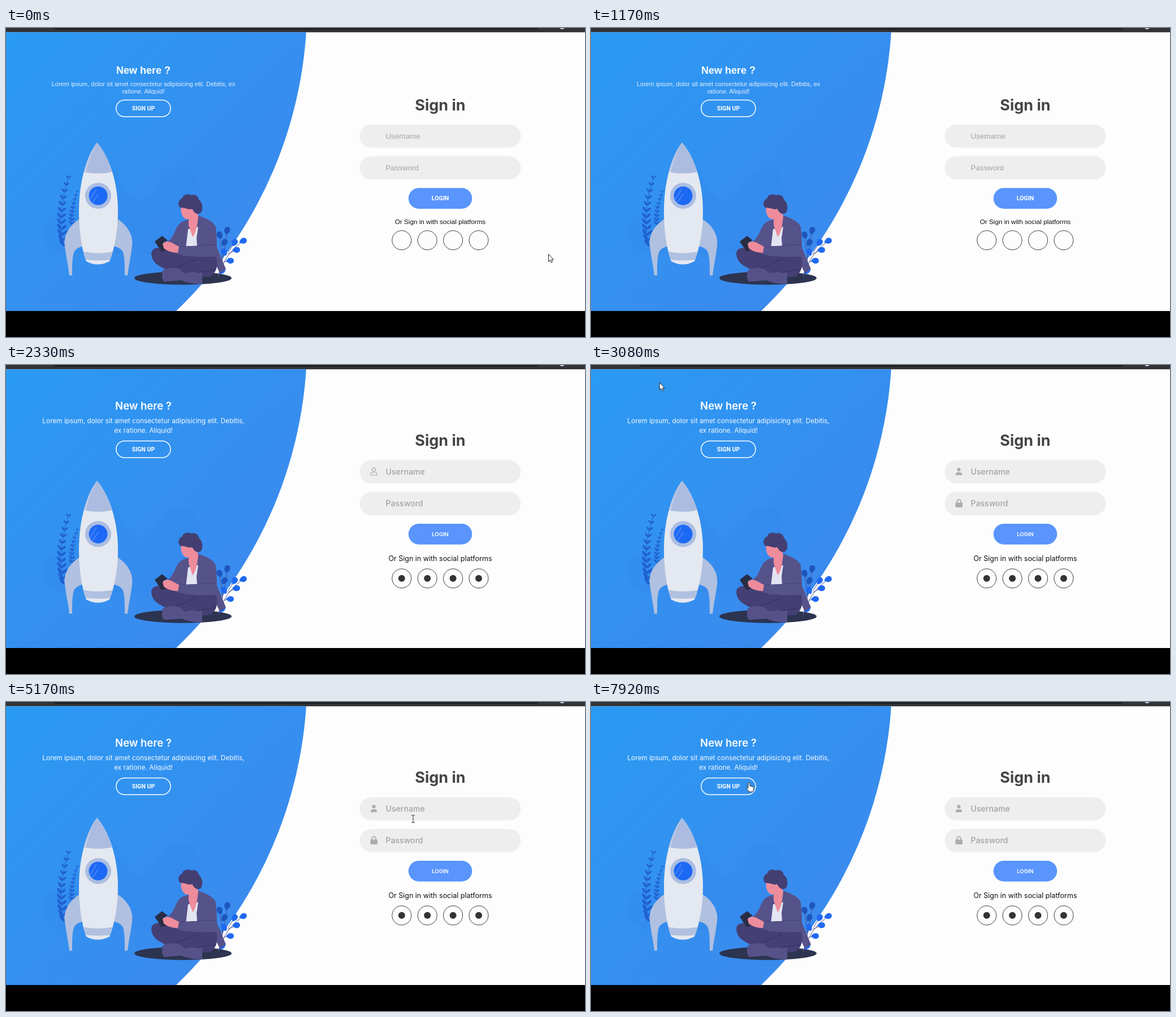
Recreate the animation shown at these times as an HTML page. Size 1024 px wide and 547 px high, loop 8000 ms.

```html
<!DOCTYPE html>
<html lang="en">
<head>
<meta charset="utf-8">
<title>Sign in</title>
<style>
  html, body { margin: 0; width: 100%; height: 100%; overflow: hidden; background: #000; }
  svg { display: block; width: 1024px; height: 547px; }
  .fallback { font-family: "Liberation Sans", Arial, sans-serif; }
  .loaded { font-family: Inter, sans-serif; }
  .button { font-family: Roboto, sans-serif; font-weight: 700; }
</style>
</head>
<body>
<svg viewBox="0 0 1024 547">
  <defs>
    <linearGradient id="sky" x1="1" y1="1" x2="0" y2="0">
      <stop stop-color="#4481eb"/><stop offset="1" stop-color="#04befe"/>
    </linearGradient>
    <clipPath id="view"><path d="M0 7.5H1024V501H0Z"/></clipPath>
    <path id="body" d="M161 203C146 222 129 265 129 325C129 355 133 390 142 413Q162 424 183 413C193 388 198 355 198 325C198 265 178 222 161 203Z"/>
    <clipPath id="inBody"><use href="#body"/></clipPath>

    <g id="art">
      <path d="M66 362Q66 330 95 330L195 250C212 318 255 316 270 276Q285 246 318 247C340 252 345 290 342 312L300 400H100Q66 396 66 362Z" fill="#1b63e0" opacity=".08"/>
      <g id="ferns" fill="#2060d0" stroke="#2060d0"></g>

      <g fill="#b0c0e0">
        <path id="fin" d="M132 337C114 347 101 366 104 386C106 404 110 420 112 438H117C117 420 117 403 121 395Q126 388 138 386Z"/>
        <use href="#fin" transform="matrix(-1 0 0 1 327 0)"/>
      </g>
      <use href="#body" fill="#e4e8f0"/>
      <g clip-path="url(#inBody)">
        <path d="M120 200H205V250Q163 265 120 250Z" fill="#acbce0"/>
        <path d="M161 203C150 222 144 240 142 256L130 250L150 200Z" fill="#bfcae4"/>
        <path d="M125 393Q163 404 202 393V407Q163 416 125 407Z" fill="#b0c0e0"/>
      </g>
      <circle cx="163" cy="297" r="23" fill="#abbde2"/>
      <circle cx="163" cy="297" r="16.5" fill="#1c69f5"/>
      <path d="M149 303L160 285M153 309L163 294" stroke="#4785f8" stroke-width="2"/>

      <ellipse cx="313" cy="442.7" rx="86" ry="11.7" fill="#2c3450"/>
      <g id="sprig"></g>
      <path d="M368 376L389 427L378 434L366 408Z" fill="#56528a"/>
      <path d="M257 399C258 389 269 387 283 391L330 403L371 402C376 419 373 432 362 440L330 443Q284 432 265 417Q257 409 257 399Z" fill="#443f74"/>
      <path d="M277 429Q288 423 304 425L320 437L318 446L280 449Q274 445 277 429ZM311 436Q328 430 347 433V453Q327 454 311 447Z" fill="#565289"/>
      <path d="M300 425L338 409M336 433L371 427" stroke="#393565" stroke-width="1.5"/>
      <path d="M320 340C308 342 303 350 299 360C293 374 287 378 281 380L301 399L318 404L371 405C375 390 372 364 371 352C365 340 352 337 341 332Z" fill="#56528a"/>
      <path d="M322 356L340 352L337 372L338 386L318 390Z" fill="#e2e5f1"/>
      <path d="M310 315C307 330 316 341 323 338L323 349L330 370Q338 361 340 332L329 317Z" fill="#ee8c9c"/>
      <path d="M308 318C302 311 306 304 312 301C313 294 322 293 327 296C335 293 341 299 341 304C347 308 349 318 346 325C343 331 336 329 333 326L329 320C324 323 317 317 308 318Z" fill="#433f72"/>
      <path d="M341 346L338 386L305 388L303 400Q340 408 371 404" fill="#56528a"/>
      <path d="M371 384Q352 383 338 386L308 387" fill="none" stroke="#454177" stroke-width="1"/>
      <path d="M263 378L276 368L286 376L278 380L279 389L284 393L275 396Z" fill="#282d43"/>
      <path d="M277 382Q284 375 293 380L306 387L304 398Q289 398 279 390Z" fill="#ee8c9c"/>
    </g>

    <path id="arrow" d="M.5 .5V13.5L3.4 10.8L5.3 15.2L7.5 14.2L5.6 10H9.5Z" fill="#fff" stroke="#222"/>
    <path id="beam" d="M-3-6.5H-1Q0-6.5 0-5.5Q0-6.5 1-6.5H3M0-5.5V5.5M-3 6.5H-1Q0 6.5 0 5.5Q0 6.5 1 6.5H3" fill="none" stroke="#444" stroke-width="1.1"/>
    <path id="hand" d="M-1.5 1Q0-1 1.5 1V6L7.5 7.5Q8.7 8 8.5 10L7 16.5H0L-4.5 10.5Q-5 8.5-3 9L-1.5 10.5Z" fill="#fff" stroke="#222"/>
  </defs>

  <path d="M0 0H1024V8H0Z" fill="#323336"/>
  <path d="M84 0H942L938 3H88Z" fill="#1e1f22"/>
  <path d="M0 6.5H1024V8H0Z" fill="#202124"/>
  <circle cx="983.5" cy="-3" r="5.2" fill="#c3cad8"/>
  <g clip-path="url(#view)">
    <path d="M0 7H1024V501H0Z" fill="#fdfdfd"/>
    <circle cx="-217.5" cy="-41" r="750" fill="url(#sky)"/>
  </g>
  <g id="before" class="fallback"></g>
  <g id="after" class="loaded"></g>
  <g id="userOutline" fill="none" stroke="#aaa" stroke-width="1.2"><use href="#user"/></g>
  <g id="icons" fill="#acacac">
    <g id="user">
      <circle cx="650.5" cy="185.2" r="3.1"/>
      <path d="M645 195V193.5Q645 190 648.5 190H652.5Q656 190 656 193.5V195Z"/>
    </g>
    <rect x="644.5" y="243.5" width="12.5" height="8.5" rx="1.2"/>
    <path d="M647.3 244V241.8A3.4 3.4 0 0 1 654.1 241.8V244" fill="none" stroke="#acacac" stroke-width="1.8"/>
  </g>
  <use id="cursor"/>
</svg>
<script>
const $ = id => document.getElementById(id);

const text = (x, y, size, fill, str, attrs = 'text-anchor="middle"') =>
  `<text x="${x}" y="${y}" font-size="${size}" fill="${fill}" ${attrs}>${str}</text>`;
const pill = (x, y, w, h, attrs) =>
  `<rect x="${x}" y="${y}" width="${w}" height="${h}" rx="${h / 2}" ${attrs}/>`;

// Fern: leaf pairs along a quadratic curve
function fern([x0, y0, cx, cy, x1, y1], pairs, size) {
  let out = `<path d="M${x0} ${y0}Q${cx} ${cy} ${x1} ${y1}" fill="none" stroke-width="1"/>`;
  for (let i = 0; i <= pairs; i++) {
    const u = i / pairs, v = 1 - u;
    const x = v * v * x0 + 2 * u * v * cx + u * u * x1;
    const y = v * v * y0 + 2 * u * v * cy + u * u * y1;
    const r = size * (1 - 0.55 * u);
    for (const side of [-1, 1])
      out += `<ellipse cx="${r}" rx="${r}" ry="${r * 0.38}" stroke="none" transform="translate(${x} ${y}) rotate(${-82 + side * 42})"/>`;
  }
  return out;
}
$('ferns').innerHTML = fern([103, 386, 88, 335, 110, 266], 11, 7.2) + fern([116, 348, 114, 320, 126, 290], 8, 4);

const leaf = (x, y, angle, fill) =>
  `<path d="M-7 0Q-2-6 2-5A5 5 0 0 1 2 5Q-2 6-7 0Z" fill="${fill}" transform="translate(${x} ${y}) rotate(${angle})"/>`;
const dark = '#1e55bd', bright = '#2069f2';
$('sprig').innerHTML =
  '<path d="M375 441Q386 400 391 362M383 408L378 370M376 438Q388 398 418 378M386 414L397 412M392 400L406 394M393 397L404 380" fill="none" stroke="#4e558f"/>' +
  leaf(391, 359, -75, dark) + leaf(378, 367, -110, dark) + leaf(386, 380, -60, dark) +
  leaf(404, 380, -60, bright) + leaf(419, 377, -20, bright) + leaf(407, 393, -5, bright) +
  leaf(396, 412, 0, bright) + leaf(386, 397, -120, bright) + leaf(382, 430, -60, bright);

function page(ready) {
  const shift = ready ? -2.3 : 0;
  const pick = (early, late) => ready ? late : early;
  const bold = 'text-anchor="middle" font-weight="600"';
  const left = `font-weight="${pick(400, 500)}"`;
  const up = pick(127.5, 134.5);
  const lines = pick(
    ['Lorem ipsum, dolor sit amet consectetur adipisicing elit. Debitis, ex', 'ratione. Aliquid!'],
    ['Lorem ipsum, dolor sit amet consectetur adipisicing elit. Debitis,', 'ex ratione. Aliquid!']);
  let out = `<use href="#art" y="${pick(0, 2.3)}"/>`;
  out += text(243, pick(81, 79), pick(18, 18.5), '#fff', 'New here ?', bold);
  lines.forEach((line, i) =>
    out += text(243, 103 + i * pick(13, 17), pick(11, 11.85), pick('#e3effc', '#f6faff'), line));
  out += pill(194.8, up, 96.2, 29.5, 'fill="none" stroke="#fff" stroke-width="1.5"');
  out += text(243, up + 18.3, 10.5, '#fff', 'SIGN UP', 'text-anchor="middle" class="button"');
  out += text(768, 145.6 + shift, 27, '#444', 'Sign in', 'text-anchor="middle" font-weight="700" class="loaded"');
  ['Username', 'Password'].forEach((label, i) => {
    const y = 170.7 + shift + i * 56.3;
    out += pill(625.5, y, 285, 41.2, 'fill="#eee"');
    out += text(671.5, y + 25.4, pick(13.3, 14.1), '#a3a3a0', label, left);
  });
  out += pill(711.8, 283.2 + shift, 112.5, 36.8, 'fill="#5995fd"');
  out += text(768, 305.4 + shift, pick(10.6, 9.6), '#fff', 'LOGIN', ready ? bold : 'text-anchor="middle" class="button"');
  out += text(768, 347, pick(11.7, 12.5), '#111', 'Or Sign in with social platforms');
  for (let i = 0; i < 4; i++) {
    const x = 699.8 + i * 45.4, y = pick(375.7, 377.8);
    out += `<circle cx="${x}" cy="${y}" r="17" fill="none" stroke="#3a3a3a"/>`;
    if (ready) out += `<circle cx="${x}" cy="${y}" r="6" fill="#333"/>`;
  }
  return out;
}
$('before').innerHTML = page(false);
$('after').innerHTML = page(true);

const LOOP = 8000, FRAME = 1000 / 12, FONTS = 2000, SOLID = 2660;
// Pointer path: time, x, y
const path = [
  [0, 959, 400], [80, 959, 400], [450, 620, 190], [800, 70, -20], [2900, 70, -20],
  [3330, 200, 110], [3750, 412.5, 219.5], [3960, 790, 390], [4170, 959, 300], [4250, 959, 300],
  [4950, 720, 207], [5180, 720, 207], [5600, 771.5, 237], [6920, 771.5, 237],
  [7250, 777, 259], [7450, 775, 252], [7880, 279.5, 142.5], [LOOP, 279.5, 142.5]
];

function pointer(t) {
  const i = Math.max(1, path.findIndex(p => p[0] > t));
  const [t0, x0, y0] = path[i - 1], [t1, x1, y1] = path[i];
  const u = (t - t0) / (t1 - t0), e = u * u * (3 - 2 * u);
  return [x0 + (x1 - x0) * e, y0 + (y1 - y0) * e];
}

function shapeAt(x, y) {
  const inside = (l, t, r, b) => x > l && x < r && y > t && y < b;
  if (inside(626, 168, 911, 209) || inside(626, 225, 911, 266)) return '#beam';
  if (inside(194, 134, 292, 165) || inside(712, 281, 824, 318)) return '#hand';
  return '#arrow';
}

const show = (id, on) => $(id).style.display = on ? '' : 'none';

function draw(now) {
  const t = Math.floor((now % LOOP + 4) / FRAME) * FRAME % LOOP;
  show('before', t < FONTS);
  show('after', t >= FONTS);
  show('userOutline', t >= FONTS && t < SOLID);
  show('icons', t >= SOLID);
  const [x, y] = pointer(t);
  $('cursor').setAttribute('href', shapeAt(x, y));
  $('cursor').setAttribute('transform', `translate(${x} ${y})`);
  show('cursor', y > -19);
  requestAnimationFrame(draw);
}
requestAnimationFrame(draw);
</script>
</body>
</html>
```
